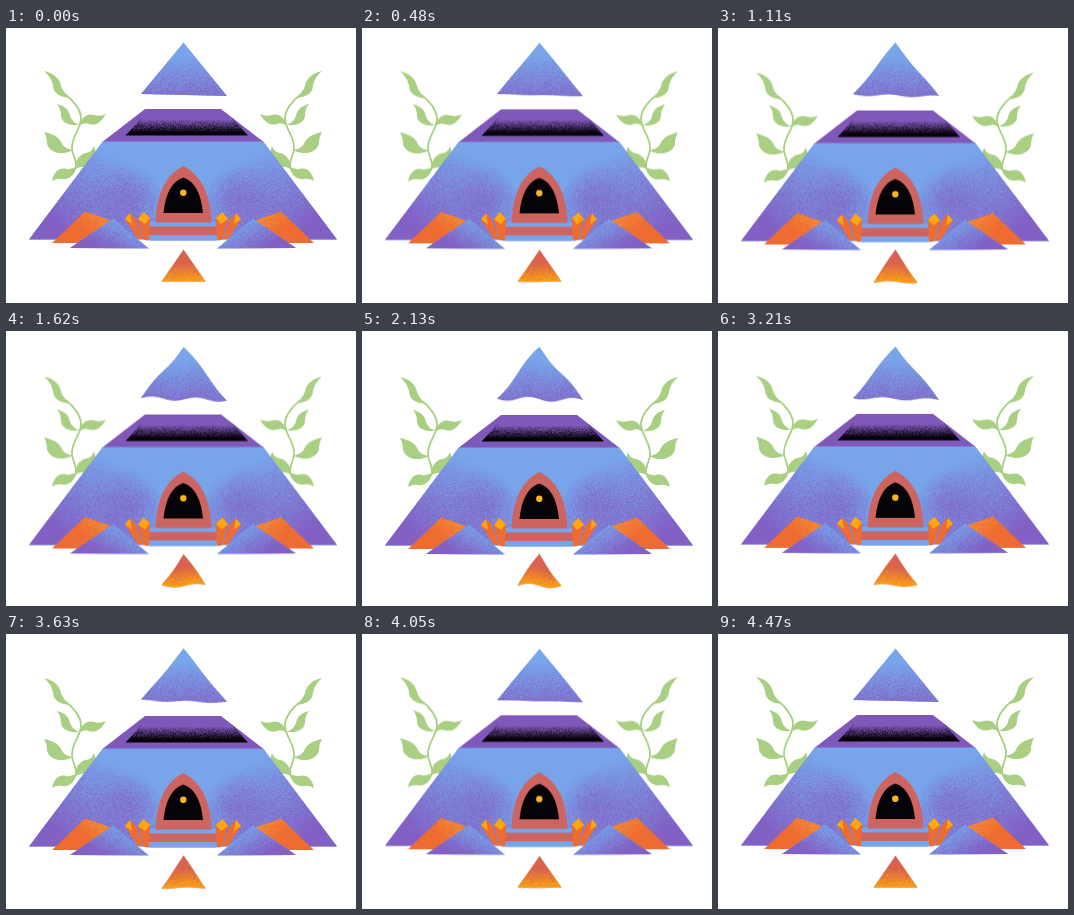
Recreate the animation shown at these times as an HTML page with a canvas. Size 350x275 px, loop 4.5 s.

```html
<!DOCTYPE html>
<html lang="en">
<head>
<meta charset="utf-8">
<title>Floating pyramid</title>
<style>
html, body { margin: 0; width: 100%; height: 100%; overflow: hidden; background: #fff; }
canvas { display: block; }
</style>
</head>
<body>
<canvas id="stage" width="350" height="275"></canvas>
<script>
const W = 350, H = 275, LOOP = 4500, AXIS = 354;
const BLUE = '#78a4ea', PURPLE = '#8360c4', BAND = '#7f58b9', RED = '#cd645f',
      ORANGE = '#ee6b32', AMBER = '#ffa80e', LEAF = '#a9cf83', BLACK = '#050208';
const screen = document.getElementById('stage').getContext('2d');
const clamp = v => Math.max(0, Math.min(1, v));

let seed = 7;
const random = () => (seed = seed * 16807 % 2147483647) / 2147483647;

function makeLayer(paint) {
  const canvas = document.createElement('canvas');
  canvas.width = W;
  canvas.height = H;
  paint(canvas.getContext('2d'));
  return canvas;
}

function fill(c, d, color) {
  c.fillStyle = color;
  c.fill(new Path2D(d));
}

// Fills a shape, then sprays a second colour over it; amount(x, y) is its strength.
function spray(c, d, [x0, y0, x1, y1], base, color, amount) {
  fill(c, d, base);
  c.save();
  c.clip(new Path2D(d));
  c.fillStyle = color;
  for (let y = y0; y < y1; y++) {
    for (let x = x0; x < x1; x++) {
      const p = clamp(amount(x, y));
      c.globalAlpha = clamp(p + (random() - 0.5) * 2 * p * (1 - p));
      c.fillRect(x, y, 1, 1);
    }
  }
  c.restore();
}

function mirrored(c, draw) {
  draw();
  c.save();
  c.translate(AXIS, 0);
  c.scale(-1, 1);
  draw();
  c.restore();
}

function vine(c) {
  c.strokeStyle = LEAF;
  c.lineWidth = 1.8;
  c.stroke(new Path2D('M60 67C67 72 75 82 75 90C75 102 65 108 66 121C67 129 71 132 70 140'));
  fill(c, 'M38 43C48 45 54 51 55 58Q57 64 64 70C53 69 47 65 47 57Q45 49 38 43Z', LEAF);
  fill(c, 'M100 86C95 95 89 98 83 96Q78 94 73 98C76 88 82 85 88 87Q94 89 100 86Z', LEAF);
  fill(c, 'M51 76C59 78 63 82 64 88Q66 94 73 97C62 98 55 94 55 87Q55 81 51 76Z', LEAF);
  fill(c, 'M38 104C48 106 54 110 56 116Q59 121 67 122C56 128 44 125 41 116Q41 109 38 104Z', LEAF);
  fill(c, 'M88 118C92 128 89 137 81 139Q75 138 69 141C69 132 74 126 80 125Q86 124 88 118Z', LEAF);
  fill(c, 'M46 153C48 143 54 139 60 141Q66 142 71 138C69 147 63 152 56 151Q51 150 46 153Z', LEAF);
}

function outcrop(c) {
  spray(c, 'M79 183.500L46 215H72L112 195Z', [46, 183, 113, 216], ORANGE, '#f59a3c',
    (x, y) => (200 - y) / 50 + (x - 75) / 60);
  spray(c, 'M107 190.500L64 220L143 220.500Z', [64, 190, 144, 222], BLUE, PURPLE,
    (x, y) => 0.5 + (100 - x) / 70 + (y - 202) / 40);
}

function crystals(c) {
  fill(c, 'M124 185L119 191L132 211H137L130 191Z', ORANGE);
  fill(c, 'M124 185L119 191L126 196Z', AMBER);
  fill(c, 'M137.500 184L132 191L138 212H143L144 190Z', ORANGE);
  fill(c, 'M137.500 184L132 191L139 196L144 190Z', AMBER);
}

function bodyShade(x, y) {
  const dx = Math.abs(x - 177);
  const cheek = Math.exp(-((dx - 50) ** 2 + (y - 167) ** 2) / 1000);
  return (dx - 50) / 110 + (y - 160) / 120 + 0.55 * cheek;
}

const temple = makeLayer(c => {
  mirrored(c, () => vine(c));
  spray(c, 'M97 113H257L331 211.500H23Z', [23, 113, 332, 213], BLUE, PURPLE, bodyShade);
  fill(c, 'M139 81H215L257 113.500H97Z', BAND);
  spray(c, 'M136 90H226L242 107.500H119.500Z', [119, 90, 243, 109], BLACK, BAND,
    (x, y) => (104 - y) / 13);
  fill(c, 'M144 194H210V212.500H144Z', BLUE);
  fill(c, 'M139 198.500H215V207H139Z', RED);
  fill(c, 'M140 207H214V212.500H140Z', BLUE);
  fill(c, 'M149.500 194.500Q151 151 177.300 138Q204 151 205.500 194.500Z', RED);
  fill(c, 'M157.500 185Q160.500 155 177.300 149.500Q194 155 197 185Z', BLACK);
  c.fillStyle = '#ffb61c';
  c.beginPath();
  c.arc(177.300, 164.700, 3.2, 0, 7);
  c.fill();
  mirrored(c, () => outcrop(c));
  mirrored(c, () => crystals(c));
});

const tips = makeLayer(c => {
  spray(c, 'M177.500 14.500L135 66L221 68Z', [135, 14, 221, 69], BLUE, PURPLE,
    (x, y) => (y - 28) / 54);
  spray(c, 'M177.500 221.500L155.500 253.500H199.500Z', [155, 221, 200, 255], '#d9634e', AMBER,
    (x, y) => (y - 234) / 22);
});

function draw(now) {
  const t = now % LOOP;
  const swing = (1 - Math.cos(2 * Math.PI * t / LOOP)) / 2;
  screen.fillStyle = '#fff';
  screen.fillRect(0, 0, W, H);
  screen.drawImage(temple, 0, 3 * swing);
  // The two loose tips ripple column by column.
  for (let x = 134; x < 222; x++) {
    const ripple = Math.sin(2 * Math.PI * ((x - 177) / 44 - (t - 2130) / 1125));
    screen.drawImage(tips, x, 0, 1, H, x, swing * (1.2 + 2.2 * ripple), 1, H);
  }
  requestAnimationFrame(() => draw(performance.now()));
}
draw(0);
</script>
</body>
</html>
```
